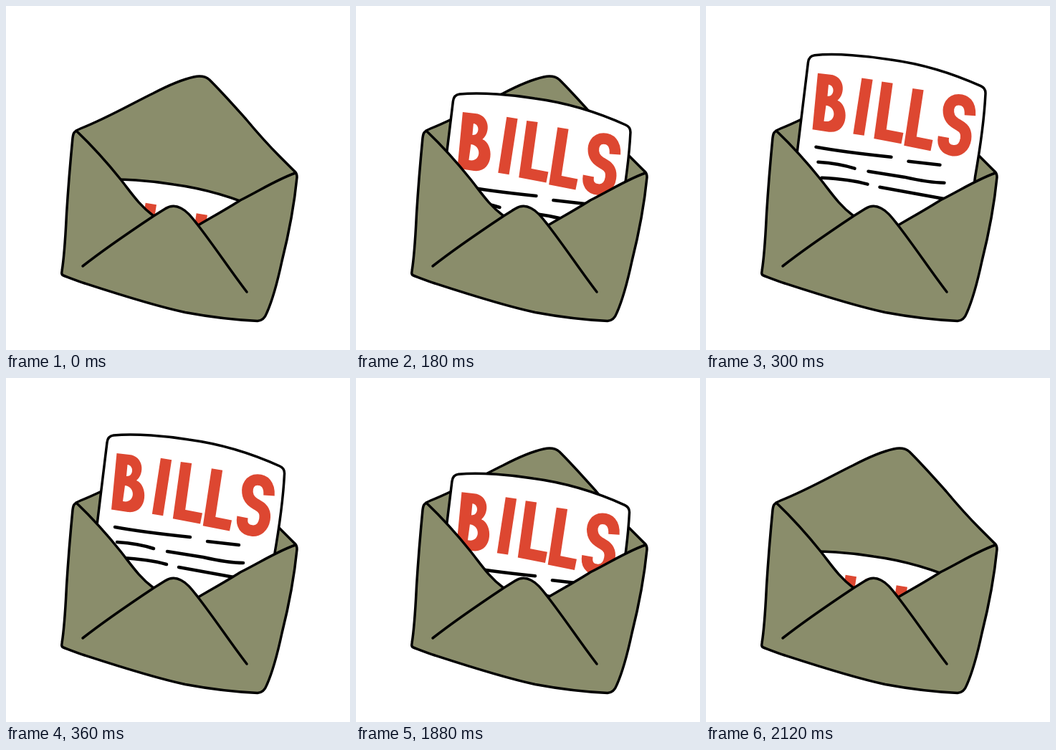
Animation, 480 px wide and 480 px high, one loop 2.62 s. Source, as an HTML page with a canvas:

```html
<!DOCTYPE html>
<html lang="en">
<head>
<meta charset="utf-8">
<title>Bills envelope</title>
<style>
  html, body { margin: 0; width: 100%; height: 100%; overflow: hidden; background: #fff; }
  canvas { display: block; width: 480px; height: 480px; }
</style>
</head>
<body>
<canvas id="stage" width="480" height="480" role="img" aria-label="A letter reading BILLS slides out of an envelope"></canvas>
<script>
const ctx = document.getElementById('stage').getContext('2d');

const OLIVE = '#8a8d6b', RED = '#dd4731', BLACK = '#000', WHITE = '#fff';
const LINE = 3.5;
const LOOP = 2620, STEP = 30, STEPS = 12, EXIT = 1790;
const HIDDEN = 163, OVERSHOOT = -17, PEAK_STEP = 9, SLANT = -0.13;

const body = new Path2D(`M97 175 Q99 173 104 171 C140 157 180 134 205 122
  C228 110 248 102 262 99 Q276 96 284 103 C304 123 318 139 335 158
  C355 182 368 196 382 210 L402 230 Q406 233 406 239
  C402 280 394 320 385 356 C379 384 372 410 364 428 Q360 439 351 439.5
  C318 438 285 434 250 427.5 C205 418 150 400 110 387
  C98 383 88 379 80 376 Q77 375 78 370 C82 345 83 320 84.5 290
  C87 250 90 215 93 184 Q94 176 97 175 Z`);

const leftFold = 'M98 174 C120 195 140 217 160 242 C175 261 186 278 206 293';
const flapTip = 'L222 283 Q233 276 244 282 C254 287 260 296 268 306';
const rightFold = 'C290 293 310 282 327 271 C355 257 380 241 404 233';

const opening = new Path2D(`${leftFold} ${flapTip} ${rightFold} L480 233 V0 H0 V174 Z`);
const folds = new Path2D(`${leftFold} M268 306 ${rightFold}
  M107 363 C135 341 170 317 206 293 ${flapTip} C292 337 313 369 336 399`);

const card = new Path2D(`M104 400 L127 205 C132 165 137 125 141 90 Q142 81 150 80
  C180 77 225 81 255 86 C300 92 340 104 382 123 Q389 126 388.5 134
  C387 165 381 210 374 250 L355 400 Z`);

const letterB = new Path2D(`M154.5 105 L172 107 C192 109 194 133 182 143
  C199 150 198 190 170 187 L147 183.5 Z
  M169.5 121 L168 137 C178 138 179 122 169.5 121 Z
  M166 150 L163 172 C180 176 182 152 166 150 Z`);

const lettersILLS = new Path2D(`
  M223.5 113 L211.5 191
  M251.5 118 L241.5 190 L272.5 196
  M294.5 127.5 L283.5 200 L313.5 206
  M367 164 C368 148 360 142 351 142 C340 142 336 152 337 160
  C338 170 345 174 352 178 C361 183 362 190 361 197
  C359 209 351 214 343 213 C333 212 328 205 330 194`);

const writing = new Path2D(`
  M152 208 Q190 215 257 222 M281 228 L325 233
  M155 229 Q185 231 206 238 M225 242 L275 250 Q310 258 331 258
  M160 251 Q200 253 224 260 M241 264 L340 282`);

function stroke(path, color, width, cap = 'round', join = 'round') {
  ctx.strokeStyle = color;
  ctx.lineWidth = width;
  ctx.lineCap = cap;
  ctx.lineJoin = join;
  ctx.stroke(path);
}

function fill(path, color) {
  ctx.fillStyle = color;
  ctx.fill(path, 'evenodd');
}

// Distance of the card below its resting place, in 30 ms steps.
function cardDrop(time) {
  if (time >= EXIT) {
    const step = Math.min(STEPS, Math.floor((time - EXIT) / STEP) + 1);
    return HIDDEN * step / STEPS;
  }
  const step = Math.min(STEPS, Math.floor(time / STEP));
  if (step <= PEAK_STEP) return HIDDEN + (OVERSHOOT - HIDDEN) * step / PEAK_STEP;
  return OVERSHOOT * (STEPS - step) / (STEPS - PEAK_STEP);
}

function drawCard(drop) {
  ctx.save();
  ctx.clip(opening);
  ctx.translate(drop * SLANT, drop);
  fill(card, WHITE);
  stroke(card, BLACK, LINE);
  fill(letterB, RED);
  stroke(lettersILLS, RED, 15.5, 'butt', 'miter');
  stroke(writing, BLACK, 4.5);
  ctx.restore();
}

function draw(now) {
  ctx.fillStyle = WHITE;
  ctx.fillRect(0, 0, 480, 480);
  fill(body, OLIVE);
  stroke(body, BLACK, LINE);
  drawCard(cardDrop(now % LOOP));
  stroke(folds, BLACK, LINE);
  requestAnimationFrame(draw);
}

requestAnimationFrame(draw);
</script>
</body>
</html>
```
